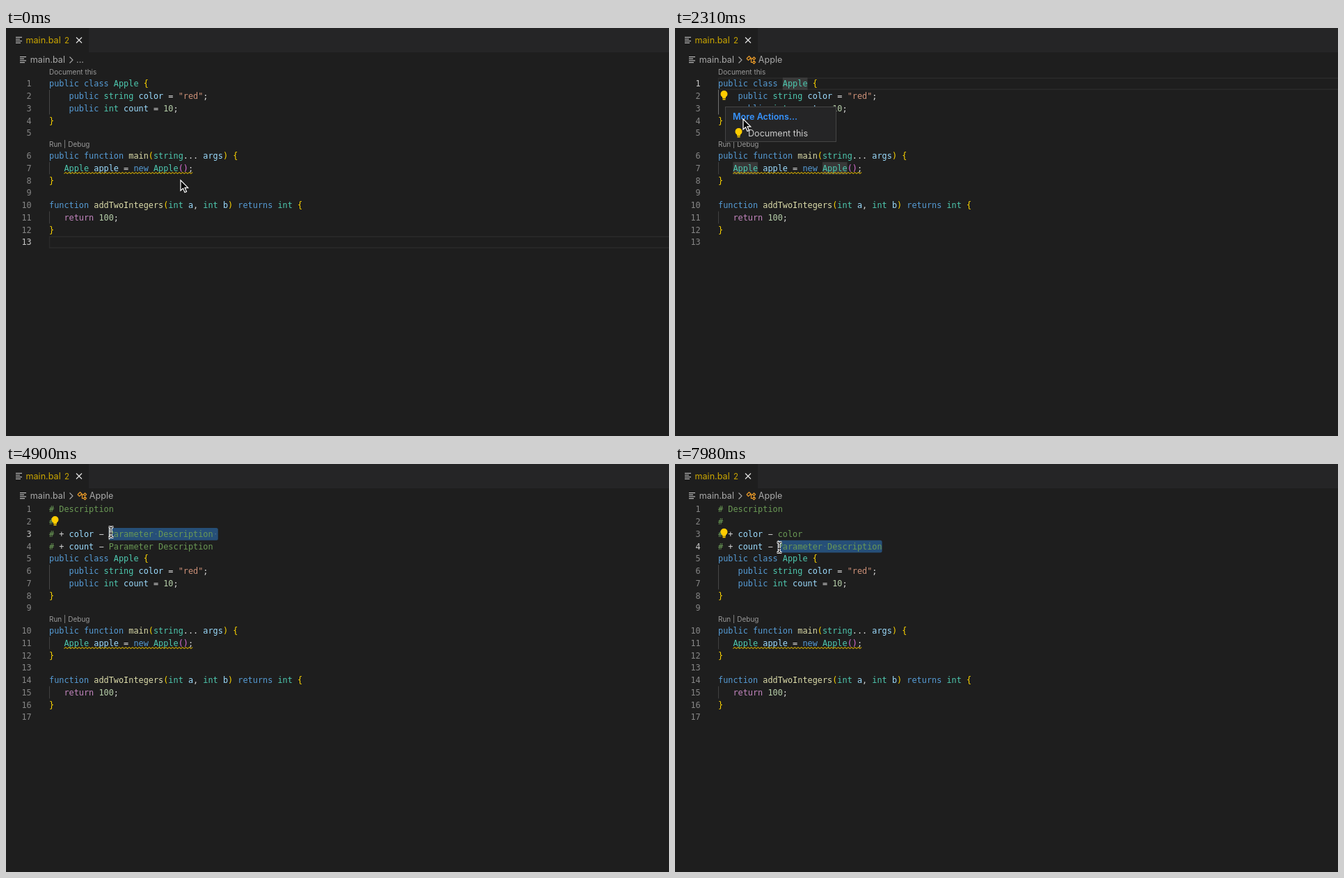
An HTML page with a canvas that plays this animation: 953x587 px, repeating every 8 s.

```html
<!DOCTYPE html>
<html lang="en">
<head>
<meta charset="utf-8">
<title>Editor</title>
<style>
html, body { margin: 0; width: 100%; height: 100%; overflow: hidden; background: #1e1e1e; }
canvas { display: block; }
</style>
</head>
<body>
<canvas id="stage" width="953" height="587"></canvas>
<script>
const ctx = document.getElementById('stage').getContext('2d');
const LEFT = 62, CHAR = 7.14, ROW = 17.75, TOP = 65.1, LENS = 15;
const MONO = '11.86px "DejaVu Sans Mono", monospace';
const UI = '12.6px Inter, sans-serif';
const SMALL = '10px Inter, sans-serif';
const WARN = '#cca700', PLAIN = '#d4d4d4', GREEN = '#6a9955', NAME = '#9cdcfe';

const CODE = `public class Apple {
    public string color = "red";
    public int count = 10;
}

public function main(string... args) {
   Apple apple = new Apple();
}

function addTwoIntegers(int a, int b) returns int {
   return 100;
}
`.split('\n');

const COLORS = {};
const paint = (color, words) => words.split(' ').forEach(w => COLORS[w] = color);
paint('#569cd6', 'public class function returns new');
paint('#4ec9b0', 'string int Apple');
paint('#dcdcaa', 'main addTwoIntegers');
paint(NAME, 'color count apple args a b');
paint('#c586c0', 'return');

// Event times in ms
const CLICK = 600, CRUMB = 860, MARKS = 1120, BULB = 1330, MENU = 2170, INSERT = 2660,
      UNLENS = 3290, PRESS = 3700, RECHECK = 3990, PRESS2 = 6930;
const TYPED = [5110, 5320, 5460, 5670, 5880];
const RINGS = [[560, 770], [2090, 2200], [2520, 2660], [PRESS, 3920], [PRESS2, 7140]];
const PATH = [
  [0, 251, 219], [70, 251, 219], [280, 272, 196], [560, 168, 80], [980, 168, 80],
  [1610, 72, 98], [2100, 72, 98], [2240, 98, 131], [2310, 98, 131], [2520, 118, 152],
  [2940, 118, 152], [3500, 304, 98], [4060, 304, 98], [4500, 151, 98], [4900, 151, 98],
  [5110, 170, 132], [6090, 170, 132], [6400, 235, 90], [6790, 299.5, 121],
  [7600, 299.5, 121], [7910, 150, 120], [8000, 150, 120]
];

const within = (t, a, b) => t >= a && t < b;
const colX = col => LEFT + col * CHAR;

function text(str, x, y, color, font, align = 'left') {
  ctx.font = font;
  ctx.fillStyle = color;
  ctx.textAlign = align;
  ctx.fillText(str, x, y);
}

function box(x, y, w, h, color) {
  ctx.fillStyle = color;
  ctx.fillRect(x, y, w, h);
}

function line(points, color, width = 1) {
  ctx.beginPath();
  points.forEach(([x, y]) => ctx.lineTo(x, y));
  ctx.strokeStyle = color;
  ctx.lineWidth = width;
  ctx.stroke();
}

function circle(x, y, r) {
  ctx.beginPath();
  ctx.arc(x, y, r, 0, 7);
}

function pointerAt(t) {
  const i = PATH.findIndex(p => p[0] > t);
  const [t0, x0, y0] = PATH[i - 1], [t1, x1, y1] = PATH[i];
  const u = (t - t0) / (t1 - t0), e = u * u * (3 - 2 * u);
  return [x0 + (x1 - x0) * e, y0 + (y1 - y0) * e];
}

function fileIcon(x, y) {
  [9, 6, 9, 7].forEach((w, i) => box(x, y + i * 2.7, w, 1.1, '#c5c5c5'));
}

function bulb(x, y) {
  ctx.fillStyle = '#ffcc00';
  circle(x, y - 2, 5);
  ctx.fill();
  box(x - 2.5, y + 1, 5, 3, '#ffcc00');
  box(x - 2, y + 4.6, 4, 1.8, '#ffcc00');
}

function header(t) {
  box(0, 0, 953, 35, '#252526');
  box(0, 0, 119, 35, '#1e1e1e');
  fileIcon(14, 12.8);
  text('main.bal', 28.5, 22.3, WARN, UI);
  text('2', 84, 21.5, WARN, '11.5px Inter, sans-serif');
  line([[101, 13.5], [109, 21.5]], '#e0e0e0', 1.3);
  line([[109, 13.5], [101, 21.5]], '#e0e0e0', 1.3);
  fileIcon(20, 41);
  text('main.bal', 34.8, 50.4, '#a9a9a9', UI);
  line([[91.5, 41.5], [96, 46], [91.5, 50.5]], '#a9a9a9', 1.1);
  if (t < CRUMB) return text('...', 101, 50.4, '#a9a9a9', UI);
  const orange = '#ee9d28';
  ctx.strokeStyle = orange;
  ctx.lineWidth = 1.2;
  line([[103, 44], [106.5, 40.5], [109, 43], [105.5, 46.5], [103, 44]], orange, 1.2);
  line([[108, 44], [112, 44]], orange, 1.2);
  line([[109.5, 44], [109.5, 49.5], [112, 49.5]], orange, 1.2);
  [43.8, 49.3].forEach(y => {
    line([[111.5, y], [113.5, y - 2], [115.5, y], [113.5, y + 2], [111.5, y]], orange, 1.2);
  });
  text('Apple', 119.8, 50.4, '#a9a9a9', UI);
}

function squiggle(from, to, y) {
  const points = [];
  for (let x = colX(from), i = 0; x <= colX(to); x += 2.4, i++) points.push([x, y + (i % 2 ? -1 : 1)]);
  line(points, WARN, 1.1);
}

// Splits a source line into coloured parts; the depth picks bracket colours.
function drawCode(src, y, state) {
  let col = 0;
  const put = (part, color) => {
    if (part.trim()) text(part, colX(col), y + 4.2, color, MONO);
    col += part.length;
  };
  if (src[0] === '#') {
    const m = src.match(/^# \+ (\w+) − (.*)$/);
    if (!m) return put(src, GREEN);
    put('# ', GREEN);
    put('+ ', PLAIN);
    put(m[1], NAME);
    put(' − ', PLAIN);
    return put(m[2], GREEN);
  }
  for (const part of src.match(/"[^"]*"|\w+|[(){}]| +|[^\w"(){} ]+/g) || []) {
    let color = COLORS[part] || PLAIN;
    if (part[0] === '"') color = '#ce9178';
    else if (/^\d/.test(part)) color = '#b5cea8';
    else if (/[({]/.test(part)) color = state.depth++ ? '#da70d6' : '#ffd700';
    else if (/[)}]/.test(part)) color = --state.depth ? '#da70d6' : '#ffd700';
    put(part, color);
  }
}

function selection(t, px) {
  const end = t < PRESS2 ? 34 : 33;
  if (!within(t, 4060, TYPED[0]) && t < 7600) return null;
  const start = Math.max(12, Math.min(end, Math.round((px - LEFT) / CHAR)));
  return start < end ? [t > 4500 && t < PRESS2 ? 12 : start, end] : null;
}

function caret(t, sel) {
  if (t < CLICK || within(t, INSERT, PRESS)) return null;
  const typed = TYPED.filter(k => t >= k).length;
  let col = 15, since = CLICK;
  if (t >= PRESS) { col = 34; since = PRESS; }
  if (typed) { col = 12 + typed; since = TYPED[typed - 1]; }
  if (t >= PRESS2) { col = 33; since = PRESS2; }
  if (sel) { col = sel[0]; since = t; }
  return (t - since) % 1000 < 500 ? col : null;
}

function drawPointer(t, x, y) {
  if (within(t, 5320, 6090)) return;
  ctx.save();
  ctx.translate(x, y);
  if (RINGS.some(([a, b]) => within(t, a, b))) {
    ctx.lineWidth = 1;
    [[17, '#999'], [14.8, '#ddd']].forEach(([r, color]) => {
      circle(0, 0, r);
      ctx.strokeStyle = color;
      ctx.stroke();
    });
  }
  if (t < 150 || within(t, 1400, 2960)) {
    ctx.beginPath();
    [[0, 0], [0, 15], [3.5, 11.8], [6, 17.5], [8.5, 16.5], [6, 10.8], [10.7, 10.8]]
      .forEach(p => ctx.lineTo(...p));
    ctx.closePath();
    ctx.fillStyle = '#000';
    ctx.fill();
    ctx.strokeStyle = '#fff';
    ctx.lineWidth = 1.2;
    ctx.stroke();
  } else {
    [['#fff', 3.2], ['#111', 1.1]].forEach(([color, w]) => {
      line([[-3.5, -7.5], [-1.2, -7.2], [0, -5.5], [0, 5.5], [-1.2, 7.2], [-3.5, 7.5]], color, w);
      line([[3.5, -7.5], [1.2, -7.2], [0, -5.5]], color, w);
      line([[0, 5.5], [1.2, 7.2], [3.5, 7.5]], color, w);
      line([[-2, 1.5], [2, 1.5]], color, w);
    });
  }
  ctx.restore();
}

function menu() {
  box(72, 113, 160, 51, '#454545');
  box(73, 114, 158, 49, '#252526');
  text('More Actions...', 83, 131.5, '#3794ff', '600 ' + UI);
  bulb(91.5, 151);
  text('Document this', 105, 156.3, '#cccccc', UI);
}

function draw(t) {
  const documented = t >= INSERT, shift = documented ? 4 : 0;
  const typed = TYPED.filter(k => t >= k).length;
  const note = typed ? 'color'.slice(0, typed) : 'Parameter Description';
  const docs = ['# Description', '#', '# + color − ' + note, '# + count − Parameter Description'];
  const lines = documented ? docs.concat(CODE) : CODE;
  const hasLens = t < UNLENS;
  const rowY = n => TOP + (n - 1) * ROW
    + (hasLens && n > shift ? LENS : 0) + (n > shift + 5 ? LENS : 0);
  const active = t < CLICK ? 13 : t < INSERT ? 1 : t < PRESS ? 5 : t < PRESS2 ? 3 : 4;
  const [px, py] = pointerAt(t);
  const sel = selection(t, px), activeY = rowY(active);

  box(0, 0, 953, 587, '#1e1e1e');
  header(t);

  if (sel) {
    ctx.fillStyle = '#264f78';
    ctx.beginPath();
    ctx.roundRect(colX(sel[0]), activeY - 8.7, (sel[1] - sel[0]) * CHAR, ROW, 2.5);
    ctx.fill();
    [21, 33].filter(c => c >= sel[0] && c < sel[1])
      .forEach(c => box(colX(c + 0.5) - 0.7, activeY - 0.7, 1.4, 1.4, '#55728f'));
  } else {
    ctx.strokeStyle = '#2a2a2a';
    ctx.lineWidth = 1.5;
    ctx.strokeRect(LEFT + 0.5, Math.round(activeY - 8) + 0.25, 900, 16);
  }

  if (within(t, MARKS, INSERT)) {
    [[1, 13], [7, 3], [7, 21]].forEach(([n, c]) =>
      box(colX(c), rowY(n) - 8.7, 5 * CHAR, ROW, 'rgba(87,87,87,.45)'));
  }

  const guide = (n, count, color) => box(62, rowY(n) - ROW / 2, 1, ROW * count, color);
  guide(shift + 2, 2, within(t, CLICK, INSERT) ? '#707070' : '#484848');
  guide(shift + 7, 1, '#404040');
  guide(shift + 11, 1, '#404040');

  const lens = (label, n) => text(label, LEFT, rowY(n) - 13.1, '#999999', SMALL);
  if (hasLens) lens('Document this', shift + 1);
  lens('Run | Debug', shift + 6);

  const state = { depth: 0 };
  lines.forEach((src, i) => {
    const y = rowY(i + 1);
    text(i + 1, 36.7, y + 4.2, i + 1 === active ? '#c6c6c6' : '#858585', MONO, 'right');
    drawCode(src, y, state);
  });
  squiggle(3, 29, rowY(shift + 7) + 7);
  if (within(t, INSERT, RECHECK)) squiggle(3, 26, rowY(7) + 7);

  const cursor = caret(t, sel);
  if (cursor !== null) box(colX(cursor), activeY - 8.5, 1.6, 17, '#aeafad');

  if (within(t, BULB, INSERT)) bulb(70.5, rowY(2) - 0.8);
  if (within(t, 4480, TYPED[0])) bulb(70.5, rowY(2) - 0.8);
  if (t >= 7770) bulb(70.5, rowY(3) - 0.8);
  if (within(t, MENU, INSERT)) menu();
  drawPointer(t, px, py);
}

function tick(now) {
  const t = now % 8000;
  draw(Math.floor(t / 70) * 70);
  requestAnimationFrame(tick);
}
requestAnimationFrame(tick);
</script>
</body>
</html>
```
